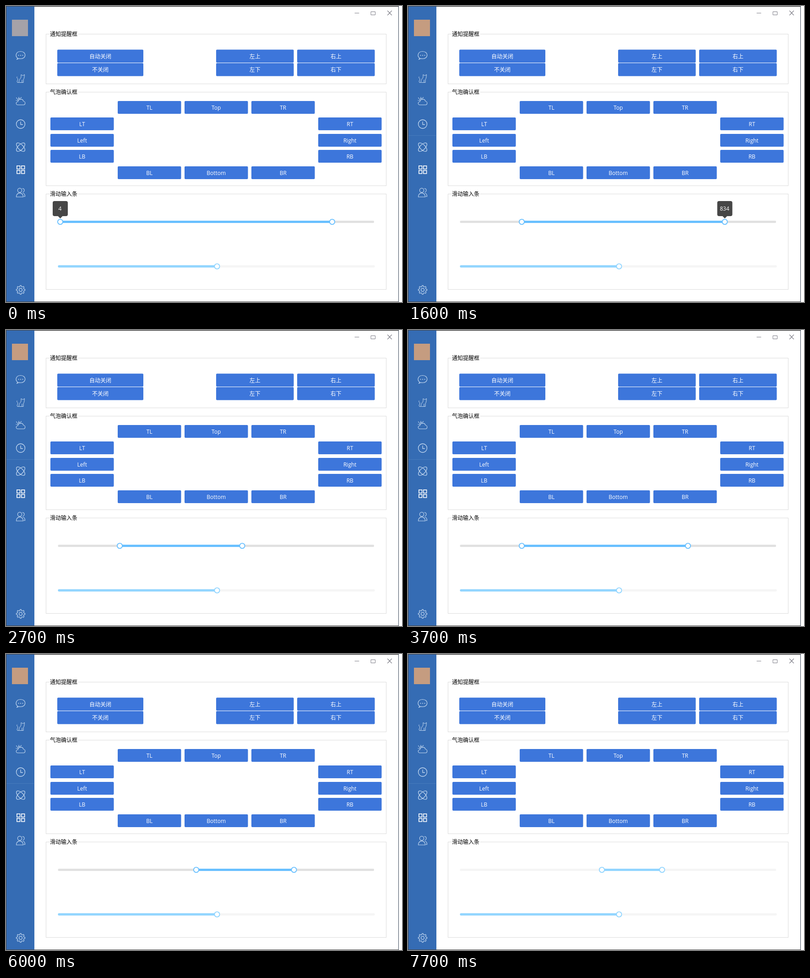
An HTML page with a canvas that plays this animation: 865x648 px, repeating every 8000 ms.

```html
<!DOCTYPE html>
<html lang="zh-CN">
<head>
<meta charset="utf-8">
<title>Slider demo</title>
<style>
html, body { margin: 0; width: 100%; height: 100%; overflow: hidden; background: #fff; }
canvas { display: block; }
</style>
</head>
<body>
<canvas id="stage" width="865" height="648"></canvas>
<script>
const ctx = document.getElementById('stage').getContext('2d');
const LOOP = 8000, STEP = 100, TAU = Math.PI * 2;
const FONT = '12px "Open Sans", "Noto Sans CJK SC", "Noto Sans CJK", sans-serif';
const BLUE = '#3d76db', SIDE = '#356cb4', ICON = '#c3d8f0';
const HOVER = { rail: [225, 225, 225], fill: [105, 192, 255] };
const IDLE = { rail: [245, 245, 245], fill: [145, 213, 255] };

// Key points: [time, value], linear in between.
const leftPath = [[0, 118.5], [100, 126], [300, 180], [500, 238], [600, 246], [700, 248.5],
  [4700, 248.5], [4800, 260], [5000, 335], [5200, 403], [5300, 415.5],
  [7099, 415.5], [7100, 423.5]];
const rightPath = [[0, 712.5], [1400, 712.5], [1500, 706], [1600, 692], [1900, 638], [2300, 548],
  [2500, 516], [3699, 516], [3700, 611.5], [4099, 611.5], [4100, 677],
  [5999, 677], [6000, 629], [6399, 629], [6400, 555]];
const hoverPath = [[0, 1], [6600, 1], [6700, 0.5], [6800, 0], [6900, 1], [7500, 1], [7600, 0.5], [7700, 0]];

function at(path, t) {
  let prev = path[0];
  for (const key of path) {
    if (t < key[0]) return prev[1] + (key[1] - prev[1]) * (t - prev[0]) / (key[0] - prev[0]);
    prev = key;
  }
  return prev[1];
}

const mix = (a, b, k) => `rgb(${a.map((v, i) => Math.round(v + (b[i] - v) * k)).join()})`;

function box(x, y, w, h, color, r = 0) {
  ctx.fillStyle = color;
  ctx.beginPath();
  ctx.roundRect(x, y, w, h, r);
  ctx.fill();
}

function text(str, x, y, color, align = 'center') {
  ctx.font = FONT;
  ctx.textAlign = align;
  ctx.fillStyle = color;
  ctx.fillText(str, x, y);
}

function line(d, x = 0, y = 0, color = ICON, width = 1.2) {
  ctx.save();
  ctx.translate(x, y);
  ctx.strokeStyle = color;
  ctx.lineWidth = width;
  ctx.lineCap = ctx.lineJoin = 'round';
  ctx.stroke(new Path2D(d));
  ctx.restore();
}

function ring(x, y, r, color = ICON, width = 1.2, fill) {
  ctx.beginPath();
  ctx.arc(x, y, r, 0, TAU);
  if (fill) { ctx.fillStyle = fill; ctx.fill(); }
  ctx.strokeStyle = color;
  ctx.lineWidth = width;
  ctx.stroke();
}

function button(label, x, y, w, h) {
  box(x, y, w, h, BLUE, 2);
  text(label, x + w / 2, y + h / 2 + 5, '#fff');
}

function group(title, y, bottom) {
  ctx.strokeStyle = '#dcdcdc';
  ctx.lineWidth = 1;
  ctx.strokeRect(87.5, y + 0.5, 743, bottom - y);
  box(95, y - 2, 63, 5, '#fff');
  text(title, 96, y + 5, '#000', 'left');
}

function gear(x, y) {
  ctx.beginPath();
  for (let i = 0; i <= 96; i++) {
    const a = i / 96 * TAU;
    const r = 8.4 + 1.2 * Math.tanh(3 * Math.cos(a * 8));
    ctx.lineTo(x + r * Math.cos(a), y + r * Math.sin(a));
  }
  ctx.closePath();
  ctx.strokeStyle = ICON;
  ctx.lineWidth = 1.2;
  ctx.stroke();
  ring(x, y, 3.4);
}

function sidebar(t) {
  box(1, 1, 61, 646, SIDE);
  box(13, 30, 35, 36, t < STEP ? '#a5a2a8' : '#c59c80');
  if (t >= STEP) box(1, 283, 60, 1, '#477bbd');

  // chat
  line('M-6 6.5 C-13 2 -10.5 -8.5 0 -8.5 C13 -8.5 13 7.5 0 7.5 Q-2 7.5 -4 7 L-8.5 9 Z', 32, 108);
  for (const dx of [-4.5, 0, 4.5]) box(31 + dx, 107, 2, 2, ICON, 1);
  // cat
  line('M-3 8.5 H6 V2 Q8 -1 8 -4 L8.5 -9 L6 -7 H3.5 L1 -9 V-4 Q1 -2 -1 0 Q-4 3 -4 8.5 H-7 Q-9 6 -6.5 3 Q-5 0 -7.5 -1 Q-9 -2 -8 -4 M3 3 V8', 32, 159, ICON, 1);
  // cloud and sun
  line('M-6 8 C-11 8 -11 1 -6 1 C-5 -6 5 -6 6 0 C11 0 11 8 6 8 Z M-6 -1 C-8 -5 -3 -8 0 -4.5 M-4 -7 V-9 M-8 -6 L-9.5 -7.5 M-8.5 -2 H-10 M0 -7 L1.5 -8.5', 32, 208.5, ICON, 1.1);
  // clock
  ring(32, 258.5, 9.5, ICON, 1.3);
  line('M0 -5 V1 H4.5', 32, 258.5, ICON, 1.3);
  // orbits
  for (const a of [-1, 1]) {
    ctx.beginPath();
    ctx.ellipse(32, 309, 12, 5.6, a * Math.PI / 4, 0, TAU);
    ctx.strokeStyle = ICON;
    ctx.lineWidth = 1.2;
    ctx.stroke();
  }
  // tiles
  ctx.strokeStyle = '#fff';
  ctx.lineWidth = 1.6;
  for (const x of [23.8, 33.8]) for (const y of [350, 360]) ctx.strokeRect(x, y, 6.8, 6.8);
  // people
  ring(30, 403.5, 4.6);
  line('M-9.5 9.5 C-9.5 -2 5.5 -2 5.5 9.5 Z M4 -9 C9 -9 9 -2 5 -1 M5 1 C9 2 9.5 5 9.5 8.5 H7', 32, 408.5);
  gear(32, 621.5);
}

function slider(y, x0, x1, from, to, rail, fill) {
  box(x0, y - 2.5, x1 - x0, 5, rail, 2);
  box(from, y - 2.5, to - from, 5, fill, 2);
}

function handle(x, y, color) {
  ring(x, y, 5.6, color, 1.9, '#fff');
}

function tooltip(x) {
  const color = '#464646';
  box(x - 16.5, 427, 33, 33, color, 4);
  ctx.beginPath();
  ctx.moveTo(x - 5, 460);
  ctx.lineTo(x + 5, 460);
  ctx.lineTo(x, 465);
  ctx.fill();
  text(Math.round((x - 115.6) / 0.6914), x - 0.5, 448, '#fff');
}

function windowFrame() {
  box(0, 0, 865, 648, '#fff');
  box(0, 0, 858, 1.5, '#444');
  box(0, 0, 1, 648, '#444');
  box(0, 647, 858, 1, '#444');
  box(857, 0, 1, 648, '#3d4a5c');
  line('M762 15.5 H771 M797.5 12.5 H806.5 V19.5 H797.5 Z', 0, 0, '#7c7c86', 1);
  line('M833.5 10.5 L842.5 20 M842.5 10.5 L833.5 20', 0, 0, '#7c7c86', 1.1);
}

function panels() {
  group('通知提醒框', 61, 170);
  button('自动关闭', 112, 95.5, 188, 28.5);
  button('不关闭', 112, 125, 188, 28.5);
  button('左上', 459, 95.5, 169.5, 28.5);
  button('右上', 636, 95.5, 169.5, 28.5);
  button('左下', 459, 125, 169.5, 28.5);
  button('右下', 636, 125, 169.5, 28.5);

  group('气泡确认框', 188, 393);
  const grid = [',TL,Top,TR,', 'LT,,,,RT', 'Left,,,,Right', 'LB,,,,RB', ',BL,Bottom,BR,'];
  grid.forEach((row, r) => row.split(',').forEach((label, c) => {
    if (label) button(label, Math.round(97.4 + c * 146.1), Math.round(208 + r * 35.8), 138.5, 28);
  }));
  group('滑动输入条', 411, 620);
}

function draw(t) {
  const left = at(leftPath, t), right = at(rightPath, t), k = at(hoverPath, t);
  const fill = mix(IDLE.fill, HOVER.fill, k);
  windowFrame();
  sidebar(t);
  panels();

  slider(472.5, 113.5, 804, left, right, mix(IDLE.rail, HOVER.rail, k), fill);
  handle(left, 472.5, fill);
  handle(right, 472.5, fill);
  if (t < 1000 || (t >= 4800 && t < 5300)) tooltip(left);
  if (t >= 1300 && t < 2600) tooltip(right);

  const idle = mix(IDLE.fill, IDLE.fill, 0);
  slider(570, 113.5, 805.5, 113.5, 461, mix(IDLE.rail, IDLE.rail, 0), idle);
  handle(461, 570, idle);
}

const start = performance.now();
function tick() {
  const t = (performance.now() - start) % LOOP;
  draw(Math.floor(t / STEP) * STEP);
  requestAnimationFrame(tick);
}
tick();
</script>
</body>
</html>
```
